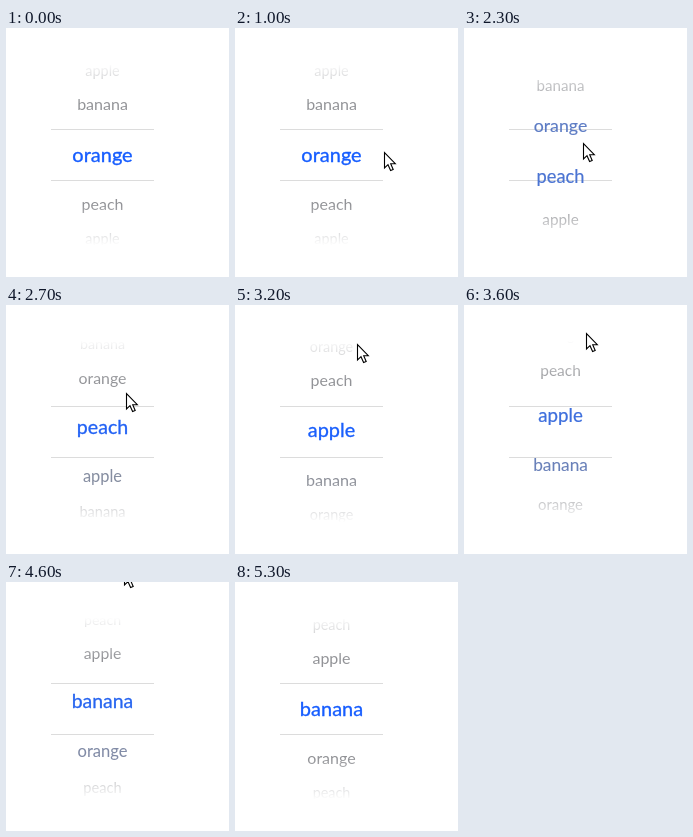
These frames come from a looping animation (223 by 249 pixels, 5800 ms). An HTML page with a canvas:

```html
<!DOCTYPE html>
<html lang="en">
<head>
<meta charset="utf-8">
<title>Fruit picker</title>
<style>
  html, body { margin: 0; width: 100%; height: 100%; overflow: hidden; background: #fff; }
  canvas { display: block; }
</style>
</head>
<body>
<canvas width="223" height="249"></canvas>
<script>
const ctx = document.querySelector('canvas').getContext('2d');
const LOOP = 5800, STEP = 100, ENTER = 100, LEAVE = 5300;
const CENTER_X = 96.5, CENTER_Y = 126.5;
const FRUITS = ['orange', 'peach', 'apple', 'banana'];
const BLUE = [22, 93, 255], GRAY = [146, 147, 151];
const ARROW = new Path2D('M.5 .7V16L4 12.7 6.6 18.5 9.2 17.5 6.7 11.7H11.3Z');

// Pointer moves; the wheel follows while dragged, then settles
const HOME = { x: 152, y: 140, scroll: 0 };
const MOVES = [
  { from: 100, to: 500, x: 150, y: 161, scroll: 0 },
  { from: 600, to: 1200, x: 149, y: 106, scroll: 0 },
  { from: 1400, to: 1870, x: 117, y: 143, scroll: 0 },
  { from: 1870, to: 2700, x: 120, y: 88, scroll: 1.1 },
  { from: 2700, to: 3200, x: 122, y: 39, scroll: 2.03 },
  { from: 3200, to: 4000, x: 121, y: 17, scroll: 2.62 },
  { from: 4000, to: 4600, x: 118, y: -13, scroll: 3.14 },
  { from: 4600, to: 5000, x: 129, y: 20, scroll: 3.08 },
  { from: 5000, to: 5200, x: 165, y: 219, scroll: 3 },
];

const mix = (a, b, p) => a + (b - a) * p;

function stateAt(t) {
  let state = HOME;
  for (const move of MOVES) {
    if (t <= move.from) break;
    const p = Math.min((t - move.from) / (move.to - move.from), 1);
    state = {
      x: mix(state.x, move.x, p),
      y: mix(state.y, move.y, p),
      scroll: mix(state.scroll, move.scroll, p),
    };
  }
  return state;
}

function drawRow(name, offset) {
  const dist = Math.abs(offset);
  const near = Math.min(dist, 1), far = Math.max(dist - 1, 0);
  const size = 20 - 4 * near - 1.6 * far;
  const y = CENTER_Y + Math.sign(offset) * (50 * near + 34 * far) + size * .36;
  ctx.font = `${size}px Lato, sans-serif`;
  ctx.fillStyle = ctx.strokeStyle = `rgb(${BLUE.map((v, i) => Math.round(mix(v, GRAY[i], near)))})`;
  ctx.fillText(name, CENTER_X, y);
  if (near < 1) {
    ctx.lineWidth = .35 * (1 - near);
    ctx.strokeText(name, CENTER_X, y);
  }
}

// Fades rows to white between two distances from the centre
function drawFade(side) {
  const inner = CENTER_Y + side * 50, outer = CENTER_Y + side * 91;
  const fade = ctx.createLinearGradient(0, inner, 0, outer);
  fade.addColorStop(0, 'rgba(255,255,255,0)');
  fade.addColorStop(1, '#fff');
  ctx.fillStyle = fade;
  ctx.fillRect(0, inner, 223, side * 130);
}

function drawPointer(x, y) {
  ctx.save();
  ctx.translate(Math.round(x), Math.round(y));
  ctx.fillStyle = '#fff';
  ctx.strokeStyle = '#000';
  ctx.lineWidth = 1.1;
  ctx.fill(ARROW);
  ctx.stroke(ARROW);
  ctx.restore();
}

function draw(now) {
  const t = Math.floor(now % LOOP / STEP) * STEP;
  const { x, y, scroll } = stateAt(t);
  ctx.fillStyle = '#fff';
  ctx.fillRect(0, 0, 223, 249);
  ctx.fillStyle = '#dcdcdc';
  for (const lineY of [101, 152]) ctx.fillRect(45, lineY, 103, 1);

  ctx.textAlign = 'center';
  const middle = Math.round(scroll);
  for (let row = middle - 3; row <= middle + 3; row++) {
    drawRow(FRUITS[(row + 4) % 4], row - scroll);
  }
  drawFade(-1);
  drawFade(1);
  if (t >= ENTER && t < LEAVE) drawPointer(x, y);
}

let start;
function tick(now) {
  start ??= now;
  draw(now - start);
  requestAnimationFrame(tick);
}
requestAnimationFrame(tick);
</script>
</body>
</html>
```
